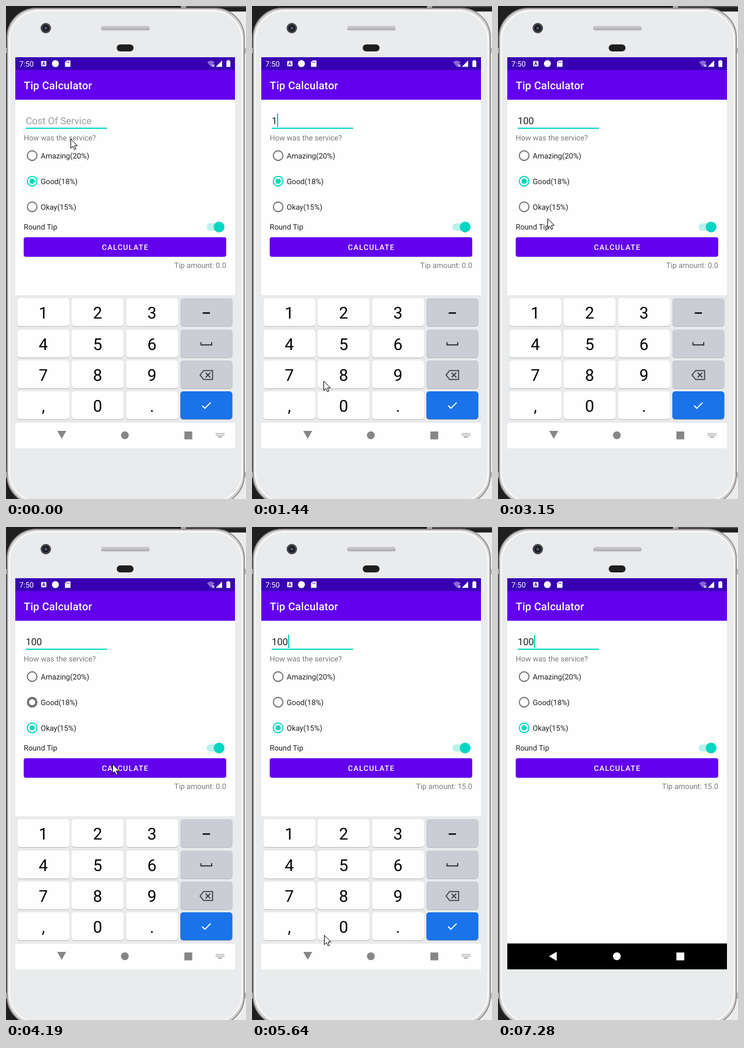
Recreate the animation shown at these times as an HTML page. Size 413 px wide and 847 px high, loop 7400 ms.

```html
<!DOCTYPE html>
<html lang="en">
<head>
<meta charset="utf-8">
<title>Tip Calculator</title>
<style>
html, body { margin: 0; width: 100%; height: 100%; overflow: hidden; background: #1f1f20; }
svg { display: block; width: 413px; height: 847px; }
text { font: 12.88px Roboto, sans-serif; fill: #1f1f1f; text-rendering: geometricPrecision; }
.soft { fill: #7b7b7b; }
.field { font-size: 16.56px; }
.key { font-size: 28px; text-anchor: middle; fill: #000; }
</style>
</head>
<body>
<svg viewBox="0 0 413 847">
  <defs>
    <clipPath id="screen"><rect x="16" y="88" width="378" height="672"/></clipPath>
    <clipPath id="buttonClip"><rect x="30.5" y="397.3" width="348.5" height="33.4" rx="3.7"/></clipPath>
    <linearGradient id="speaker" x2="0" y2="1">
      <stop offset="0" stop-color="#b4b4b6"/><stop offset=".3" stop-color="#cfcfd1"/>
      <stop offset=".6" stop-color="#a9a9ab"/><stop offset="1" stop-color="#d2d2d4"/>
    </linearGradient>
  </defs>

  <!-- phone body -->
  <rect x="380" y="9" width="33" height="838" fill="#ececee"/>
  <path d="M310 1H413M383 9.5H413" stroke="#8c8c8e"/>
  <rect x="301" y="0" width="9" height="8" fill="#a9a4a7"/>
  <path d="M0 72h3v9h-3zM0 800h3v10h-3zM409 72h4v9h-4zM409 800h4v10h-4z" fill="#b9b5b8"/>
  <rect x="2" y="4" width="408" height="852" rx="50" fill="#d6d2d4" stroke="#938e91" stroke-width="2"/>
  <rect x="5.5" y="8" width="401" height="844" rx="51" fill="#eaebec" stroke="#f9f9f9" stroke-width="2.5"/>
  <circle cx="68.5" cy="38" r="9" fill="#48484a"/>
  <circle cx="68.5" cy="38" r="6" fill="#1b1c20"/>
  <circle cx="68.5" cy="38" r="2.6" fill="#48536a"/>
  <rect x="164" y="34.5" width="83" height="8" rx="3" fill="url(#speaker)"/>
  <rect x="190.5" y="66" width="29" height="12" rx="6" fill="#1f1f20"/>

  <g clip-path="url(#screen)">
    <rect x="16" y="88" width="378" height="672" fill="#fefefe"/>
    <rect x="16" y="88" width="378" height="22" fill="#3700b3"/>
    <rect x="16" y="110" width="378" height="51" fill="#6200ee"/>

    <!-- status bar -->
    <text x="23" y="104" style="fill:#fff">7:50</text>
    <rect x="60.5" y="94.5" width="9" height="9" rx="1" fill="#fff"/>
    <path d="M62.7 101.8 65 96.2l2.3 5.6M63.6 100h2.8" fill="none" stroke="#3700b3" stroke-width="1.1"/>
    <circle cx="85" cy="99" r="6" fill="#fff"/>
    <path d="M104.500 93.5h6.5v11h-9.5v-8z" fill="#fff"/>
    <path d="M104.6 95.5v2.3M106.6 95.5v2.3M108.6 95.5v2.3" stroke="#3700b3" stroke-width=".9"/>
    <path d="M346 96.5Q352.5 91 359 96.5L352.5 104.5Z" fill="#fff" opacity=".4"/>
    <path d="M354.5 100.5l4 4m0-4l-4 4" stroke="#fff" stroke-width="1.1"/>
    <path d="M372 93.5v11h-11z" fill="#fff"/>
    <path d="M381 93h3.4v1.3h1.6v10.5h-6.7v-10.5h1.7z" fill="#fff"/>
    <text x="30.5" y="142.5" style="font-size:18.4px;font-weight:500;letter-spacing:.0115em;fill:#fff">Tip Calculator</text>

    <!-- form -->
    <text id="cost" class="field" x="34" y="203"></text>
    <rect x="34" y="209" width="140" height="2" fill="#03d5c1"/>
    <rect id="caret" y="185" width="2" height="23" fill="#03d5c1"/>
    <text class="soft" x="30.5" y="231">How was the service?</text>
    <circle id="radioRipple" cx="45" cy="345" r="18"/>
    <g id="radios"></g>
    <text x="30.5" y="384">Round Tip</text>
    <rect x="345" y="373.5" width="30" height="12.5" rx="6.25" fill="#b9f2ec"/>
    <circle cx="366.7" cy="380.5" r="9.2" opacity=".12"/>
    <circle cx="366.7" cy="379.6" r="9.2" fill="#03d6c2"/>
    <rect id="shadow" x="31" y="398.5" width="347.5" rx="4"/>
    <rect x="30.5" y="397.3" width="348.5" height="33.4" rx="3.7" fill="#6200ee"/>
    <g clip-path="url(#buttonClip)"><circle id="buttonRipple" cx="205" cy="414" fill="#fff"/></g>
    <text x="165" y="419" style="font-weight:500;letter-spacing:.0893em;fill:#fff">CALCULATE</text>
    <text id="tip" class="soft" x="379" y="450" text-anchor="end"></text>

    <!-- keyboard -->
    <g id="keyboard">
      <rect x="16" y="497" width="378" height="219" fill="#e8eaec"/>
      <g id="keys"></g>
      <path d="M338.5 527.5h12.5" stroke="#000" stroke-width="2.4"/>
      <path d="M335.5 577.5v4.8h18.5v-4.8" fill="none" stroke="#333" stroke-width="1.9"/>
      <path d="M334 634l6-7.7h15.5v15.4H340zM343.5 630l8 8m0-8l-8 8" fill="none" stroke="#3c4043" stroke-width="1.8"/>
      <path d="M337.5 686.5l4.7 4.7 10-10" fill="none" stroke="#fff" stroke-width="1.8"/>
    </g>

    <!-- navigation bar -->
    <rect id="bar" x="16" y="715.5" width="378" height="45"/>
    <rect id="navRipple" x="47" y="716" width="97" height="44" rx="22"/>
    <g id="icons">
      <path id="back" d="M87.5 737.5L101 729.8V745.2Z"/>
      <circle cx="204.5" cy="737.5" r="6.7"/>
      <rect x="307" y="731" width="13.5" height="13.5"/>
    </g>
    <path id="imeIcon" d="M361 734.5h14.500M361 737.500h14.500" stroke="#777" stroke-width="1.5" stroke-dasharray="1.5 1.1"/>
    <path id="imeSpace" d="M364.500 740.500h7.500" stroke="#777" stroke-width="1.300"/>
  </g>

  <path id="cursor" d="M.5 .5V16.5L4.2 13 6.7 18.7 9.2 17.6 6.8 12H11.8Z" fill="#fff" stroke="#000"/>
</svg>

<script>
const LOOP = 7400, NS = "http://www.w3.org/2000/svg";
const $ = id => document.getElementById(id);
const set = (el, attrs) => { for (const k in attrs) el.setAttribute(k, attrs[k]); };
const add = (parent, tag, attrs, text = "") => {
  const el = parent.appendChild(document.createElementNS(NS, tag));
  set(el, attrs);
  el.textContent = text;
  return el;
};
const ramp = (t, a, b) => Math.min(1, Math.max(0, (t - a) / (b - a)));
const smooth = p => p * p * (3 - 2 * p);
const mix = (a, b, p) => a + (b - a) * p;
const within = (t, a, b) => t >= a && t < b;
// Latest value of a [time, value] list
const latest = (steps, t) => steps.reduce((v, s) => t >= s[0] ? s[1] : v, steps[0][1]);

const keys = {};
["123 ", "456 ", "789 ", ",0. "].forEach((row, r) => [...row].forEach((label, c) => {
  const x = 19.5 + c * 93.5, y = Math.round(502.2 + r * 53.4);
  const fill = c < 3 ? "#fefefe" : r < 3 ? "#cacdd4" : "#1a73e8";
  const box = { x, y, width: 89.5, height: 48, rx: 5 };
  add($("keys"), "rect", { ...box, y: y + 1, fill: "#b4b7ba" });
  const rect = add($("keys"), "rect", { ...box, fill });
  if (label === " ") return;
  add($("keys"), "text", { class: "key", x: x + 44.7, y: y + 35 }, label);
  keys[label] = rect;
}));

const radios = ["Amazing(20%)", "Good(18%)", "Okay(15%)"].map((label, i) => {
  const y = 257 + 44 * i;
  add($("radios"), "text", { x: 59.8, y: y + 5 }, label);
  return {
    ring: add($("radios"), "circle", { cx: 45, cy: y, fill: "none" }),
    dot: add($("radios"), "circle", { cx: 45, cy: y })
  };
});

function drawRadio({ ring, dot }, on, width, dotSize) {
  const color = on ? "#03d5c1" : "#707070";
  set(ring, { stroke: color, "stroke-width": width, r: 9.2 - width / 2 });
  set(dot, { fill: color, r: dotSize });
}

// Pointer: time, x, y
const path = [
  [0, 111, 228], [30, 111, 228], [770, 76, 525], [1180, 76, 525], [1440, 123, 644], [1590, 135, 697],
  [1700, 135, 697], [1760, 139, 698], [2400, 139, 698], [2670, 169, 423], [2850, 169, 423],
  [3150, 85, 365], [3390, 62, 345], [3910, 62, 345], [4190, 183, 407], [4370, 203, 407],
  [4430, 203, 407], [4490, 205, 407], [5180, 205, 407], [5510, 148, 670], [5830, 89, 745],
  [6340, 89, 745], [6700, 96, 850], [LOOP, 96, 850]
];

function pointer(t) {
  const i = path.findIndex(p => p[0] > t);
  const [a, b] = [path[i - 1], path[i]];
  const p = ramp(t, a[0], b[0]);
  return [mix(a[1], b[1], p), mix(a[2], b[2], p)].map(Math.round);
}

function caretOn(t) {
  if (t < 1240) return within(t, 30, 510) || t >= 970;
  if (t < 2430) return !within(t, 1760, 2220);
  return Math.floor((t - 2415) / 486) % 2 === 0;
}

function render(t) {
  const typed = latest([[0, ""], [1240, "1"], [2220, "10"], [2430, "100"]], t);
  $("cost").textContent = typed || "Cost Of Service";
  $("cost").style.fill = typed ? "#202020" : "#9c9c9c";
  set($("caret"), { x: Math.round(33.8 + 9.3 * typed.length), opacity: +caretOn(t) });
  $("tip").textContent = "Tip amount: " + (t < 4970 ? "0.0" : "15.0");

  set(keys[1], { fill: within(t, 970, 1240) ? "#dcdde0" : "#fefefe" });
  set(keys[0], { fill: within(t, 2010, 2430) ? "#dcdde0" : "#fefefe" });

  const picked = t >= 4010;
  drawRadio(radios[0], false, 1.84, 0);
  drawRadio(radios[1], !picked,
    t < 4130 ? 1.84 : mix(5.4, 1.84, ramp(t, 4130, 4270)),
    mix(4.6, 0, ramp(t, 4010, 4130)));
  drawRadio(radios[2], picked,
    mix(1.84, 5.4, ramp(t, 4010, 4080)) - mix(0, 3.56, ramp(t, 4080, 4100)),
    mix(0, 4.6, ramp(t, 4080, 4180)));
  set($("radioRipple"), {
    r: 18 * smooth(ramp(t, 3640, 3800)),
    opacity: .12 * (1 - ramp(t, 3990, 4170))
  });

  const press = ramp(t, 4790, 4880) * (1 - ramp(t, 5090, 5300));
  set($("buttonRipple"), {
    r: mix(20, 180, ramp(t, 4780, 4980)) * (t >= 4790),
    opacity: .3 * (1 - ramp(t, 5090, 5300))
  });
  set($("shadow"), { height: 33 + 3 * press, opacity: .18 - .06 * press });

  const hide = ramp(t, 6150, 6340), nav = ramp(t, 6160, 6330);
  set($("keyboard"), { transform: `translate(0 ${70 * hide})`, opacity: 1 - hide });
  set($("bar"), { opacity: nav });
  set($("navRipple"), { opacity: .12 * ramp(t, 5990, 6090) * (1 - ramp(t, 6250, 6420)) });
  const shade = Math.round(mix(134, 255, Math.min(1, nav * 2.3)));
  set($("icons"), { fill: `rgb(${shade},${shade},${shade})` });
  set($("back"), { transform: `rotate(${-90 * (1 - smooth(nav))} 94.7 736.3)` });
  for (const id of ["imeIcon", "imeSpace"]) set($(id), { opacity: 1 - ramp(nav, 0, .3) });

  const [x, y] = pointer(t);
  set($("cursor"), { transform: `translate(${x} ${y})` });
}

function tick() {
  render(performance.now() % LOOP);
  requestAnimationFrame(tick);
}
tick();
</script>
</body>
</html>
```
